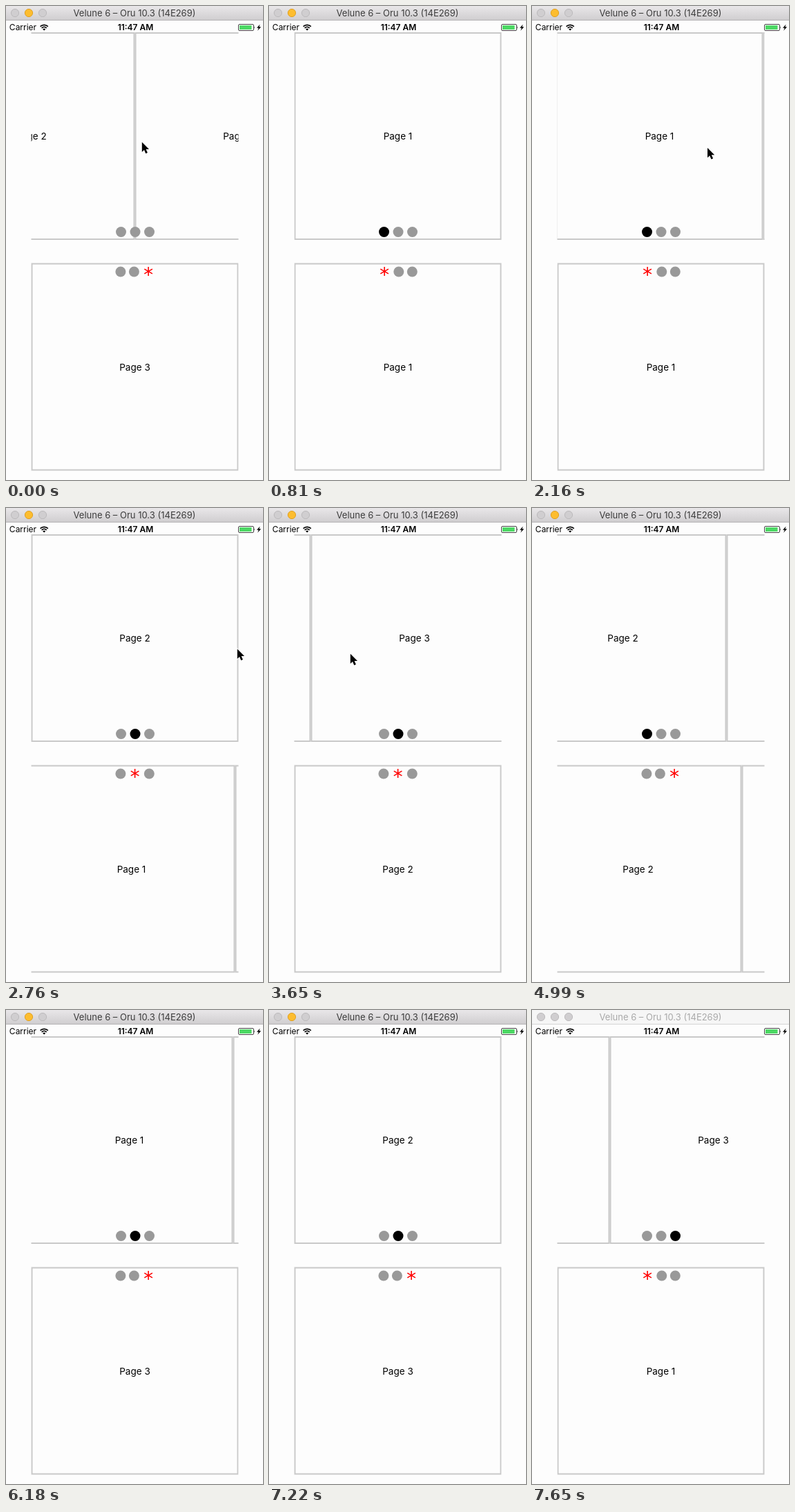
Animation of 372 by 685 pixels, one loop 7.75 s. Source, as an HTML page:

```html
<!DOCTYPE html>
<html lang="en">
<head>
<meta charset="utf-8">
<title>Pager demo</title>
<style>
  html, body { margin: 0; width: 100%; height: 100%; overflow: hidden; background: #fdfdfd; }
  svg { display: block; width: 372px; height: 685px; }
  text { font-family: Inter, Roboto, "Liberation Sans", sans-serif; text-anchor: middle; }
  .page { fill: none; stroke: #c9c9c9; stroke-width: 2; }
  .label { font-size: 13.5px; }
  .status { font-size: 12px; }
  .bar { fill: url(#bar); }
  .edge { fill: #b4b2b4; }
  .title { fill: #3c3c3c; font-size: 13px; }
  .light { fill: #d0ced0; stroke: #bcbabc; }
  .amber { fill: #fdbd2f; stroke: #dfa023; }
  .idle .bar { fill: #f6f6f6; }
  .idle .edge { fill: #d4d4d4; }
  .idle .title { fill: #a9a9a9; }
  .idle .amber { fill: #d0ced0; stroke: #bcbabc; }
</style>
</head>
<body>
<svg viewBox="0 0 372 685" xmlns="http://www.w3.org/2000/svg">
  <defs>
    <linearGradient id="bar" x2="0" y2="1">
      <stop offset="0" stop-color="#e9e7e9"/><stop offset="1" stop-color="#d0ced0"/>
    </linearGradient>
    <clipPath id="view"><rect x="36.5" width="300" height="685"/></clipPath>
  </defs>

  <g id="window">
    <rect class="bar" width="372" height="20"/>
    <rect class="edge" y="20" width="372" height="1"/>
    <circle class="light" cx="13" cy="10" r="5.6"/>
    <circle class="amber" cx="33" cy="10" r="5.6"/>
    <circle class="light" cx="53" cy="10" r="5.6"/>
    <text class="title" x="186" y="15">Velune 6 – Oru 10.3 (14E269)</text>
  </g>

  <text class="status" x="24.5" y="35.4">Carrier</text>
  <g fill="none" stroke="#000" stroke-width="1.7">
    <path d="M49.6 29.6a8 8 0 0 1 11.2 0M51.7 31.9a5 5 0 0 1 7 0"/>
    <path d="M55.2 35.6l-2 -2a2.8 2.8 0 0 1 4 0z" fill="#000" stroke="none"/>
  </g>
  <text class="status" x="187.5" y="35.4" font-weight="600">11:47 AM</text>
  <rect x="336.5" y="26.5" width="22" height="9" rx="1.5" fill="none" stroke="#444"/>
  <rect x="338" y="28" width="17.5" height="6" fill="#4cd964"/>
  <path d="M359.3 29.3q1.6 1.7 0 3.4z" fill="#333"/>
  <path d="M367.6 26.5l-4.6 5.2h2.7l-1.6 4 5-5.4h-2.7z"/>

  <g id="pagers"></g>

  <path id="cursor" d="M.8 .8V15L4 12L6.3 17.2L8.9 16.1L6.6 11H11Z"
    stroke="#fff" stroke-width="1.8" paint-order="stroke"/>
</svg>
<script>
const LOOP = 7750, SLIDE = 320, PAGES = 3, SIZE = 300, LEFT = 36.5;
const STEP = 148.7, PHASE = 66;   // screen refresh
const IDLE = 7370;                // window loses focus

const byId = id => document.getElementById(id);
const move = (el, x, y) => el.setAttribute("transform", `translate(${x} ${y})`);
const show = (el, on) => el.setAttribute("visibility", on ? "visible" : "hidden");
const ease = p => (1 - Math.cos(Math.PI * Math.min(p, 1))) / 2;

// Every turn goes to the next page, and from the last back to the first.
// A swipe marks its dot only once the page has settled.
const auto = at => ({ at, time: SLIDE, lag: 0 });
const swipe = at => ({ at, time: SLIDE, lag: SLIDE });
const jump = at => ({ at, time: 1, lag: 0 });

function add(parent, tag, attrs, text) {
  const el = document.createElementNS("http://www.w3.org/2000/svg", tag);
  for (const k in attrs) el.setAttribute(k, attrs[k]);
  if (text) el.textContent = text;
  parent.append(el);
  return el;
}

function makePager(top, dotY, first, turns) {
  const root = byId("pagers");
  const strip = add(add(root, "g", { "clip-path": "url(#view)" }), "g", {});
  const dots = [];
  for (let i = 0; i < PAGES; i++) {
    const x = LEFT + i * SIZE;
    add(strip, "rect", { class: "page", x: x + 1, y: top + 1, width: SIZE - 2, height: SIZE - 2 });
    add(strip, "text", { class: "label", x: x + SIZE / 2, y: top + 155 }, "Page " + (i + 1));
    dots.push(add(root, "circle", { cy: dotY, r: 7.5 }));
  }
  return { strip, dots, first, turns };
}

const upper = makePager(38, 326.5, 1,
  [swipe(-160), auto(430), swipe(2130), swipe(3373), auto(4832), auto(6129), auto(7437)]);
const lower = makePager(371.5, 384, 2,
  [jump(-9), auto(480), auto(2715), auto(4904), jump(7220)].slice(1));
const star = add(byId("pagers"), "path", {
  d: "M0 -6.5V6.5M-5.8 -3.4L5.8 3.4M-5.8 3.4L5.8 -3.4", stroke: "#f00", "stroke-width": 1.6
});

// Slides the strip and returns the marked page, or -1 before any is known.
function turnPages({ strip, first, turns }, t) {
  const done = turns.filter(s => s.at <= t).length;
  const page = n => (first + n) % PAGES;
  let pos = first;
  if (done) {
    const { at, time } = turns[done - 1], from = page(done - 1);
    pos = from + (page(done) - from) * ease((t - at) / time);
  }
  move(strip, -Math.round(SIZE * pos), 0);
  const marked = turns.filter(s => s.at + s.lag <= t).length;
  return marked || turns[0].at > 0 ? page(marked) : -1;
}

function drawDots(dots, active) {
  dots.forEach((d, i) => {
    d.setAttribute("cx", 187 + 20.5 * (i - 1));
    d.setAttribute("fill", i === active ? "#000" : "#999");
  });
}

// The star's cell is a little wider than a dot's; the row stays centred.
function drawStar(dots, active) {
  const dotCell = 19.5, starCell = 21.9;
  let x = 186.6 - (dotCell * (PAGES - 1) + starCell) / 2;
  dots.forEach((d, i) => {
    const cell = i === active ? starCell : dotCell;
    d.setAttribute("cx", x + cell / 2);
    d.setAttribute("fill", "#999");
    show(d, i !== active);
    if (i === active) move(star, x + cell / 2, 383.5);
    x += cell;
  });
}

// Pointer strokes: start, end, x, y
const strokes = [
  [0, 300, 130, 203], [1260, 1710, 281, 204], [2130, 2310, 0, 206],
  [2400, 2700, 334, 203], [3373, 3620, 117, 210], [3850, 4390, 356, 575]
];

function drawCursor(t) {
  let x = 196, y = 196;
  for (const [start, end, toX, toY] of strokes) {
    if (t <= start) break;
    const p = Math.min((t - start) / (end - start), 1);
    x += (toX - x) * p;
    y += (toY - y) * p;
  }
  move(byId("cursor"), x, y);
  show(byId("cursor"), t < 600 || (t > 950 && t < 4500));
}

function draw(now) {
  const t = Math.max(0, PHASE + Math.floor((now % LOOP - PHASE) / STEP) * STEP);
  drawDots(upper.dots, turnPages(upper, t));
  drawStar(lower.dots, turnPages(lower, t));
  drawCursor(t);
  byId("window").classList.toggle("idle", t >= IDLE);
}

const begin = performance.now();
function tick() {
  draw(performance.now() - begin);
  requestAnimationFrame(tick);
}
tick();
</script>
</body>
</html>
```
